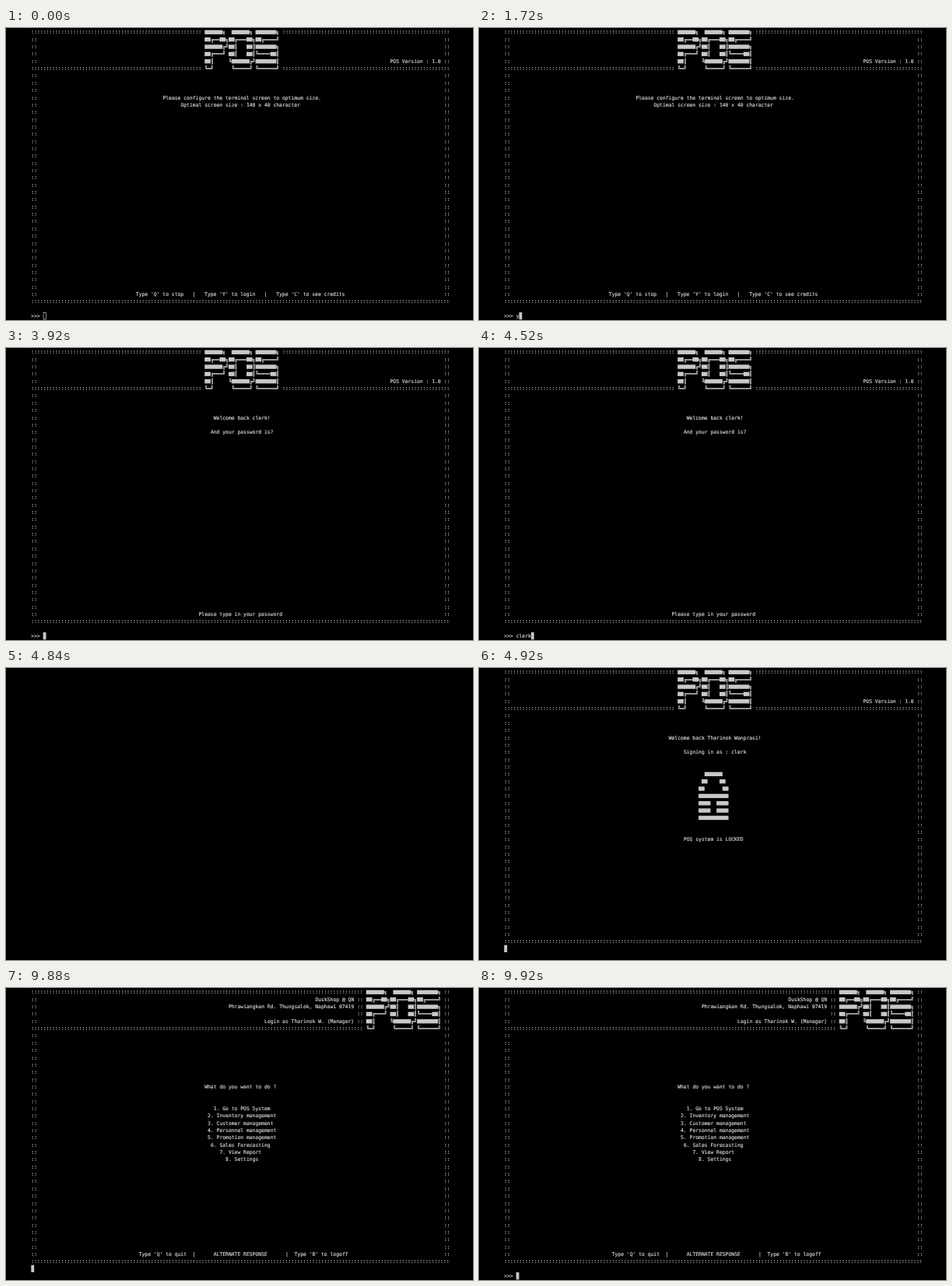
Write an HTML page that moves like this. It is 600 px wide and 375 px high and loops after 10 s.

```html
<!DOCTYPE html>
<html lang="en">
<head>
<meta charset="utf-8">
<title>Terminal login</title>
<style>
  html, body { margin: 0; width: 100%; height: 100%; overflow: hidden; background: #000; }
  svg { display: block; width: 100vw; height: 100vh; }
  text {
    font: 6.383px "DejaVu Sans Mono", "Liberation Mono", monospace;
    fill: #dcdcdc;
    stroke: #dcdcdc;
    stroke-width: 0.15px;
    white-space: pre;
    text-rendering: geometricPrecision;
  }
  .block { fill: #c8c8c8; }
</style>
</head>
<body>
<svg id="stage" viewBox="0 0 600 375" xmlns="http://www.w3.org/2000/svg">
  <rect width="600" height="375" fill="#000"/>
</svg>
<script>
const LOOP = 10000;
const COLS = 140;
const CELL_W = 3.843, CELL_H = 9.35;
const stage = document.getElementById('stage');

const colX = col => 32.3 + col * CELL_W;
const rowY = row => 5 + row * CELL_H;   // middle of the row

function add(parent, tag, attrs, content) {
  const el = document.createElementNS('http://www.w3.org/2000/svg', tag);
  for (const key in attrs) el.setAttribute(key, attrs[key]);
  if (content) el.textContent = content;
  parent.appendChild(el);
  return el;
}

// Writes a string on the grid; full blocks become bars.
function put(g, row, col, str) {
  for (const run of str.matchAll(/█+/g)) {
    add(g, 'rect', {
      class: 'block', x: colX(col + run.index), y: rowY(row) - 2.3,
      width: run[0].length * CELL_W, height: 5.4
    });
  }
  const rest = str.replace(/█/g, ' ');
  const lead = rest.length - rest.trimStart().length;
  if (rest.trim()) {
    add(g, 'text', { x: colX(col + lead), y: rowY(row) + 2.35 }, rest.trim());
  }
}

const center = (g, row, str) => put(g, row, Math.ceil((COLS - str.length) / 2), str);
const putRight = (g, row, end, str) => put(g, row, end - str.length, str);
const dots = (g, row, from, to) => put(g, row, from, ':'.repeat(to - from));

const BANNER = [
  '██████╗  ██████╗ ███████╗',
  '██╔══██╗██╔═══██╗██╔════╝',
  '██████╔╝██║   ██║███████╗',
  '██╔═══╝ ██║   ██║╚════██║',
  '██║     ╚██████╔╝███████║',
  '╚═╝      ╚═════╝ ╚══════╝'
];

const LOCK = [
  '  ██████  ',
  ' ██    ██ ',
  '██      ██',
  '██████████',
  '████  ████',
  '████  ████',
  '██████████'
];

function frame(g, bannerCol) {
  BANNER.forEach((line, row) => put(g, row, bannerCol, line));
  for (let row = 1; row < 37; row++) {
    if (row !== 5) dots(g, row, 0, 2);
    if (row !== 5 || bannerCol > 100) dots(g, row, COLS - 2, COLS);
  }
  dots(g, 37, 0, COLS);
}

// Page with the banner in the middle; lines are [row, text].
function page(lines) {
  const g = add(stage, 'g', {});
  frame(g, 58);
  for (const row of [0, 5]) {
    dots(g, row, 0, 57);
    dots(g, row, 84, COLS);
  }
  put(g, 4, 120, 'POS Version : 1.0');
  for (const [row, str] of lines) center(g, row, str);
  return g;
}

function lockPage(open, lines) {
  const g = page([
    [9, 'Welcome back Tharinok Wanprasi!'],
    [11, 'Signing in as : clerk'],
    ...lines
  ]);
  LOCK.forEach((line, i) => put(g, 14 + i, 65, open && i === 2 ? '        ██' : line));
  return g;
}

function menuPage() {
  const g = add(stage, 'g', {});
  frame(g, 112);
  for (const row of [0, 5]) dots(g, row, 0, 111);
  for (let row = 1; row < 5; row++) dots(g, row, 109, 111);
  dots(g, 0, COLS - 2, COLS);
  putRight(g, 1, 108, 'DuskShop @ QN');
  putRight(g, 2, 108, 'Phrawiangkan Rd. Thungsalok, Naphawi 07419');
  putRight(g, 4, 108, 'Login as Tharinok W. (Manager)');
  center(g, 13, 'What do you want to do ?');
  ['Go to POS System', 'Inventory management', 'Customer management',
   'Personnel management', 'Promotion management', 'Sales Forecasting',
   'View Report', 'Settings'
  ].forEach((item, i) => center(g, 16 + i, `${i + 1}. ${item}`));
  put(g, 36, 36, "Type 'Q' to quit  |");
  put(g, 36, 61, 'ALTERNATE RESPONSE');
  put(g, 36, 85, "|  Type 'B' to logoff");
  return g;
}

const pages = {
  start: page([
    [9, 'Please configure the terminal screen to optimum size.'],
    [10, 'Optimal screen size : 140 x 40 character'],
    [36, "Type 'Q' to stop   |   Type 'Y' to login   |   Type 'C' to see credits"]
  ]),
  user: page([
    [9, 'Please type in your username'],
    [11, '(or scan the Personnel token code)']
  ]),
  pass: page([
    [9, 'Welcome back clerk!'],
    [11, 'And your password is?'],
    [36, 'Please type in your password']
  ]),
  locked: lockPage(false, [[23, 'POS system is LOCKED']]),
  unlocked: lockPage(true, [
    [23, 'POS system is now UNLOCK'],
    [36, 'Redirecting you to POS system...']
  ]),
  menu: menuPage()
};

const prompt = add(stage, 'text', { x: colX(0), y: rowY(39) + 2.35 });
const cursor = add(stage, 'rect', { class: 'block', width: CELL_W, height: 9.2 });
const hollow = add(stage, 'rect', {
  x: colX(4) + 0.4, y: rowY(39) - 4.2, width: CELL_W - 0.6, height: 8.6,
  fill: 'none', stroke: '#c8c8c8', 'stroke-width': 0.7
});
const pointer = add(stage, 'path', {
  d: 'M302 215.8q1.5 0 1.5 1.2v6q0 1.2 -1.5 1.2M305 215.8q-1.5 0 -1.5 1.2M303.5 223q0 1.2 1.5 1.2',
  fill: 'none', stroke: '#8a8a8a', 'stroke-width': 0.7
});

// [start, page, typed text]; null text means no prompt yet.
const steps = [
  [0, 'start', ''],
  [1680, 'start', 'y'],
  [2200, 'user', ''],
  [3320, 'user', 'c'],
  [3360, 'user', 'cl'],
  [3520, 'user', 'cle'],
  [3680, 'user', 'cler'],
  [3720, 'user', 'clerk'],
  [3920, 'pass', ''],
  [4200, 'pass', 'c'],
  [4280, 'pass', 'cl'],
  [4360, 'pass', 'cle'],
  [4520, 'pass', 'clerk'],
  [4840, 'blank', null],
  [4920, 'locked', null],
  [6920, 'unlocked', null],
  [9880, 'menu', null],
  [9920, 'menu', '']
];

const show = (el, on) => el.setAttribute('visibility', on ? 'visible' : 'hidden');

function render(t) {
  const [, name, typed] = steps.findLast(step => step[0] <= t);
  for (const key in pages) show(pages[key], key === name);

  const asking = typed !== null;
  prompt.textContent = asking ? '>>> ' + typed : '';
  cursor.setAttribute('x', colX(asking ? 4 + typed.length : 0));
  cursor.setAttribute('y', rowY(asking ? 39 : 38) - 4.5);

  const unfocused = t < 360;
  show(hollow, unfocused);
  show(cursor, !unfocused && name !== 'blank');
  show(pointer, t >= 880 && t < 1720);
}

const begin = performance.now();
function tick() {
  render((performance.now() - begin) % LOOP);
  requestAnimationFrame(tick);
}
tick();
</script>
</body>
</html>
```
